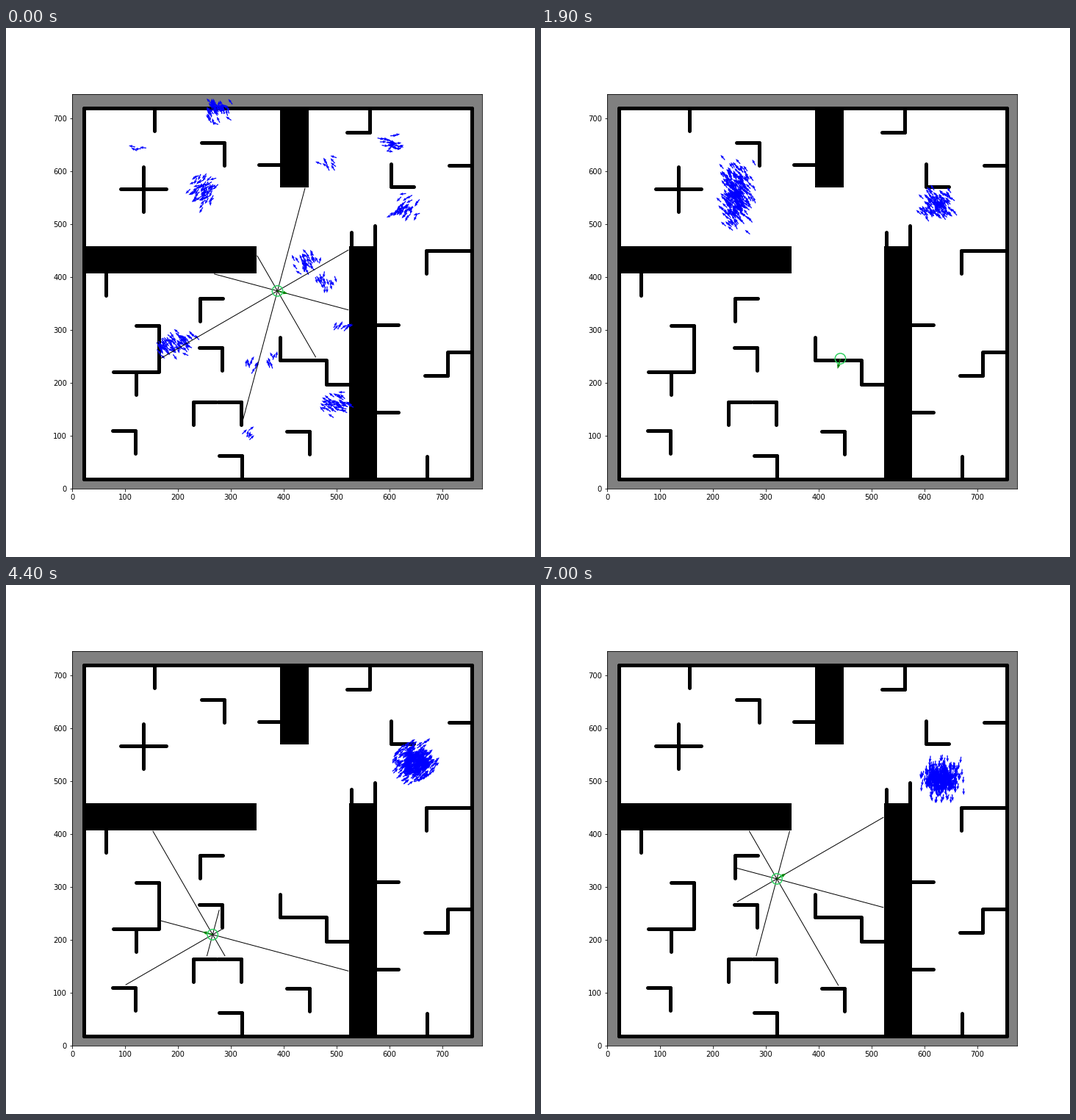
These frames come from a looping animation (720 by 720 pixels, 7100 ms). A matplotlib script:

```python
import numpy as np
import matplotlib.pyplot as plt
from matplotlib.animation import FuncAnimation
from matplotlib.collections import LineCollection
from matplotlib.patches import Circle, Rectangle

SIZE, DPI = 720, 72
LEFT, BASE, SCALE = 90, 627, 0.72      # axes corner in pixels, pixels per map unit
MAP_W, MAP_H = 775, 746
FRAMES, INTERVAL = 71, 100
PARTICLES = 400
WALL, ARM = 5, 31                      # thickness and length of a wall piece
COMPASS = {"N": (0, -ARM), "E": (ARM, 0), "S": (0, ARM), "W": (-ARM, 0)}

# Every wall is a joint with equal arms along the compass (stage pixels, y down)
JOINTS = [
    (201, 108, "S"), (296, 155, "WS"), (374, 185, "W"), (494, 142, "WN"),
    (523, 215, "NE"), (633, 187, "W"), (186, 219, "NESW"), (135, 332, "S"),
    (263, 367, "SE"), (207, 404, "W"), (207, 435, "NS"), (176, 467, "EWS"),
    (293, 434, "WS"), (372, 451, "NE"), (404, 451, "E"), (435, 484, "NE"),
    (254, 508, "SE"), (288, 508, "E"), (319, 508, "WS"), (175, 547, "WS"),
    (320, 581, "WS"), (412, 548, "WS"), (571, 302, "SE"), (602, 302, "E"),
    (600, 472, "WN"), (600, 440, "E"), (502, 403, "E"), (502, 522, "E"),
    (572, 613, "N"), (469, 308, "N"), (501, 299, "N"),
]
ROOM = (105, 108, 633, 613)
BLOCKS = [(373, 108, 411, 216), (105, 297, 340, 333), (467, 297, 504, 613)]

# Early guesses that die out: x, y, particle count
GUESSES = [
    (290, 115, 52), (520, 157, 26), (411, 322, 34), (434, 338, 16),
    (213, 430, 36), (242, 428, 36), (453, 513, 50), (440, 188, 9),
    (457, 408, 8), (180, 162, 4), (332, 461, 8), (363, 456, 7), (325, 556, 6),
]


def to_map(points):
    """Centre of a stage pixel in map units."""
    p = np.asarray(points, float) + 0.5
    return (p - (LEFT, BASE)) / (SCALE, -SCALE)


def unit(deg):
    a = np.radians(deg)
    return np.stack([np.cos(a), np.sin(a)], axis=-1)


def ramp(t, start, end):
    return float(np.clip((t - start) / (end - start), 0, 1))


def robot_path():
    """Drive straight, spending one step on each clockwise turn."""
    pos, heading = np.array([388.2, 373.8]), -15
    poses = [(pos, heading)]
    legs = [(7, 12, 90), (19, 10, 90), (24, 10, 90), (1, 10, 45), (15, 10, 0)]
    for steps, speed, turn in legs:
        for _ in range(steps):
            pos = pos + speed * unit(heading)
            poses.append((pos, heading))
        if turn:
            heading -= turn
            poses.append((pos, heading))
    return poses


def wall_lines():
    x0, y0, x1, y1 = ROOM
    corners = [(x0, y0), (x1, y0), (x1, y1), (x0, y1)]
    lines = list(zip(corners, corners[1:] + corners[:1]))
    for x, y, arms in JOINTS:
        for dx, dy in map(COMPASS.get, arms):
            lines.append(((x, y), (x + dx, y + dy)))
    return [to_map(line) for line in lines]


def block_box(x0, y0, x1, y1):
    """Lower and upper map corner of an inclusive pixel box."""
    return to_map((x0 - 0.5, y1 + 0.5)), to_map((x1 + 0.5, y0 - 0.5))


def obstacle_boxes():
    half = WALL / 2 / SCALE
    boxes = [block_box(*b) for b in BLOCKS]
    boxes += [(line.min(axis=0) - half, line.max(axis=0) + half) for line in LINES]
    return np.array(boxes)


def cast_rays(pos, heading):
    low, high = BOXES[:, 0] - 1, BOXES[:, 1] + 1
    if np.any(np.all((low < pos) & (pos < high), axis=1)):
        return []
    rays = []
    for d in unit(heading + 45 * np.arange(8)):
        t0, t1 = (low - pos) / d, (high - pos) / d
        enter = np.minimum(t0, t1).max(axis=1)
        leave = np.maximum(t0, t1).min(axis=1)
        reach = enter[(enter < leave) & (enter > 0)].min()
        rays.append([pos, pos + reach * d])
    return rays


def clusters(t, heading):
    """Rows of x, y, spread x, spread y, heading, weight."""
    settle, switch = ramp(t, 0, 8), ramp(t, 27, 36.5)
    stretch, drift = ramp(t, 0, 11), ramp(t, 53, 70)
    shared = heading + 235
    west = (268 + 9 * switch, 219 + 27 * stretch - 28 * ramp(t, 11, 26),
            9, 11 + 9 * stretch - 8 * ramp(t, 20, 36),
            shared, (62 + 238 * settle) * (1 - switch))
    east = (542 + 12 * switch - 8 * drift, 243 + 16 * drift,
            8 + 3 * settle, 7 + 4 * settle,
            shared, 40 + 80 * settle + 280 * switch)
    rows = [west, east]
    rng = np.random.default_rng(8)
    for x, y, n in GUESSES:
        spread = 3 + 0.8 * n ** 0.5
        rows.append((x, y, spread, 0.85 * spread, rng.uniform(0, 360),
                     n * (1 - settle)))
    return np.array(rows)


def particles(frame, heading):
    """Resample all clusters in proportion to their weights."""
    rng = np.random.default_rng(100 + frame)
    table = clusters(frame, heading)
    share = np.cumsum(table[:, 5]) / table[:, 5].sum()
    pick = table[np.searchsorted(share, (np.arange(PARTICLES) + 0.5) / PARTICLES)]
    noise = np.clip(rng.normal(size=(PARTICLES, 2)), -2.6, 2.6)
    angle = pick[:, 4] + rng.normal(0, 16 - 8 * ramp(frame, 0, 8), PARTICLES)
    return to_map(pick[:, :2] + noise * pick[:, 2:4]), unit(angle)


def arrows(count, color, width, z):
    zero = np.zeros(count)
    return ax.quiver(zero, zero, zero + 1, zero, color=color, units="dots",
                     scale_units="dots", scale=1, width=width, headwidth=3,
                     headlength=4, headaxislength=3.6, zorder=z)


fig = plt.figure(figsize=(SIZE / DPI, SIZE / DPI), dpi=DPI, facecolor="white")
ax = fig.add_axes([LEFT / SIZE, 1 - BASE / SIZE,
                   MAP_W * SCALE / SIZE, MAP_H * SCALE / SIZE])
ax.set_facecolor("#808080")
ax.set_xticks(range(0, MAP_W, 100))
ax.set_yticks(range(0, MAP_H, 100))
ax.tick_params(labelsize=10)

for box, color in [(ROOM, "white")] + [(b, "black") for b in BLOCKS]:
    low, high = block_box(*box)
    ax.add_patch(Rectangle(low, *(high - low), color=color, lw=0, zorder=1))

LINES = wall_lines()
BOXES = obstacle_boxes()
POSES = robot_path()

ax.add_collection(LineCollection(LINES, colors="black", linewidths=WALL,
                                 capstyle="round", zorder=1.5))
swarm = arrows(PARTICLES, "blue", 1.25, 3)
rays = LineCollection([], colors="black", linewidths=1, zorder=4)
ax.add_collection(rays, autolim=False)
nose = arrows(1, "green", 1.6, 5)
body = Circle((0, 0), 10, fill=False, ec="#2fd060", lw=1.5, zorder=6)
ax.add_patch(body)
ax.set(xlim=(0, MAP_W), ylim=(0, MAP_H))


def draw(frame):
    pos, heading = POSES[frame]
    spots, aim = particles(frame, heading)
    swarm.set_offsets(spots)
    swarm.set_UVC(*(9 * aim).T)
    rays.set_segments(cast_rays(pos, heading))
    nose.set_offsets([pos])
    nose.set_UVC(*(14.4 * unit([heading])).T)
    body.center = pos
    return swarm, rays, nose, body


anim = FuncAnimation(fig, draw, frames=FRAMES, interval=INTERVAL,
                     init_func=lambda: draw(0), repeat=True)
plt.show()
```
